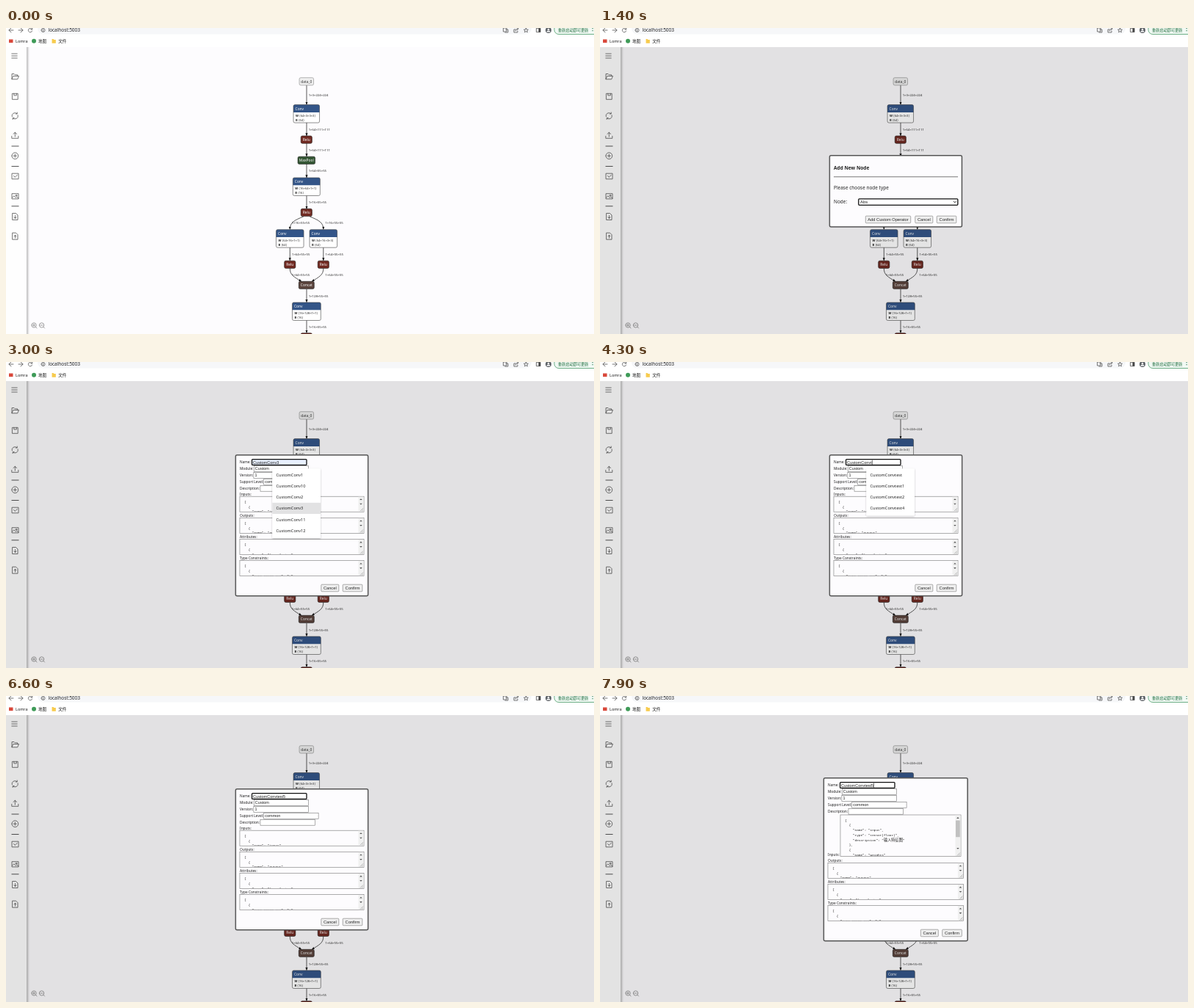
Recreate the animation shown at these times as an HTML page. Size 800 by 417 pixels, loop 8000 ms.

```html
<!DOCTYPE html>
<html lang="en">
<head>
<meta charset="utf-8">
<title>Model editor: add a custom operator</title>
<style>
  html, body { margin: 0; width: 100%; height: 100%; overflow: hidden; background: #fff; }
  svg { display: block; }
  text { white-space: pre; font-family: "Noto Sans", "Noto Sans CJK SC", sans-serif; }
  .ui { font-family: "Liberation Sans", Arial, sans-serif; }
  .code { font-family: "Liberation Mono", "Noto Sans CJK SC", monospace; }
  .icon { fill: none; stroke: #555; stroke-width: .8; stroke-linecap: round; stroke-linejoin: round; }
</style>
</head>
<body>
<svg id="stage" width="800" height="417" viewBox="0 0 800 417">
  <defs>
    <marker id="arrow" viewBox="0 0 4 4" refX="3.8" refY="2" markerWidth="4" markerHeight="4" markerUnits="userSpaceOnUse" orient="auto">
      <path d="M0 .4 4 2 0 3.6Z" fill="#111"/>
    </marker>
    <filter id="shadow" x="-20%" y="-20%" width="140%" height="140%">
      <feDropShadow dx="0" dy="1" stdDeviation="1.2" flood-opacity=".25"/>
    </filter>
    <linearGradient id="edge"><stop stop-color="#bbb"/><stop offset="1" stop-color="#bbb" stop-opacity="0"/></linearGradient>
  </defs>
  <g id="page"></g>
  <g id="overlay"></g>
</svg>
<script>
const LOOP = 8000;
const BLUE = '#335588', RED = '#702921', GREEN = '#335533', BROWN = '#59423b';
const PAPER = '#fdfcfe', INK = '#222';

const rect = (x, y, w, h, fill, extra = '') =>
  `<rect x="${x}" y="${y}" width="${w}" height="${h}" fill="${fill}" ${extra}/>`;
const text = (x, y, size, str, extra = '') =>
  `<text x="${x}" y="${y}" font-size="${size}" fill="${INK}" ${extra}>${str}</text>`;
const path = (d, extra = '') => `<path d="${d}" ${extra}/>`;
const icon = (x, y, d) => path(d, `class="icon" transform="translate(${x} ${y})"`);
const circle = (r) => `M${-r} 0a${r} ${r} 0 1 0 ${2 * r} 0a${r} ${r} 0 1 0 ${-2 * r} 0`;

// ---- browser bars and sidebar ----

function browser() {
  const small = [
    [7, 3, 'M3 0H-3M0 -3-3 0 0 3'], [20, 3, 'M-3 0H3M0 -3 3 0 0 3'],
    [33, 3, 'M2.4 -1.2A2.7 2.7 0 1 0 2.6 1M2.7 -3V-1H.7'],
    [50.5, 3, circle(2.5) + 'M0 -.2V1.4M0 -1.4V-1.3'],
    [680, 3, 'M-3 -3H1V2H-3ZM0 -1H3V3H-1'], [694, 3, 'M-1 -1H-3V3H2V1M-1 1Q-1 -2 3 -2M1 -4 3 -2 1 0'],
    [707.5, 3, 'M0 -3 .9 -.9 3 -.7 1.4 .7 1.9 2.8 0 1.7-1.9 2.8-1.4 .7-3 -.7-.9 -.9Z'],
    [724.5, 3, 'M-2.6 -2.6H2.6V2.6H-2.6Z'],
  ];
  return rect(0, 0, 800, 26, '#fff') +
    rect(43, -8, 672, 16.5, '#f6f7f9', 'rx="8"') +
    small.map(a => icon(...a)).join('') +
    rect(724.5, 0.4, 2.6, 5.2, '#444') +
    `<circle cx="738" cy="3" r="4" fill="#5f6368"/><circle cx="738" cy="2" r="1.3" fill="#fff"/>` +
    path('M735.4 5.6a2.6 2 0 0 1 5.2 0Z', 'fill="#fff"') +
    rect(746, -6, 60, 14.5, '#f1f9f4', 'rx="6" stroke="#4a9b68" stroke-width=".8"') +
    text(751, 5.2, 5.2, '重新启动即可更新', 'style="fill:#1e6b3a"') +
    rect(797.6, 0, 1, 1.2, '#1e6b3a') + rect(797.6, 3, 1, 1.2, '#1e6b3a') +
    text(57.5, 5.2, 6.4, 'localhost:5003') +
    rect(4, 15.5, 5.5, 4.6, '#d9483b') + text(13, 20, 5.5, 'Lomra') +
    '<circle cx="38" cy="17.8" r="3" fill="#3f9b58"/>' + text(44, 20, 5.5, '地图') +
    path('M62.5 15h2l.8 1h2.5v4.8h-5.3Z', 'fill="#f7cb4d"') + text(71.3, 20, 5.5, '文件');
}

function sidebar() {
  const doc = 'M-3.5 -4.5H1L3.5 -2V4.5H-3.5Z';
  const icons = [
    [11.5, 38, 'M-3.7 -3H3.7M-3.7 0H3.7M-3.7 3H3.7'],
    [12.5, 66, 'M-4.5 3.5V-3.5H-1.5L-.3 -2.2H3.2V-.5M-4.5 3.5-2.7 -.5H5L3.3 3.5Z'],
    [12.5, 93.3, 'M-3.7 -4H3.7V4H-3.7ZM-1.7 -4V-1.4H1.8V-4'],
    [12.2, 119.8, 'M-4 1A4.1 4.1 0 0 1 2.6 -3.2M4 -1A4.1 4.1 0 0 1 -2.6 3.2M3 -4.8V-2.8H1M-3 4.8V2.8H-1'],
    [12.3, 146.3, 'M-4.5 1V4H4.5V1M0 1.8V-4M-2.4 -1.8 0 -4 2.4 -1.8'],
    [12.3, 174.2, circle(4.4) + 'M-2.2 0H2.2M0 -2.2V2.2'],
    [12.7, 202, 'M-4.3 -3.8H4.3V3.8H-4.3ZM-2.2 -.6-.4 1.4 2.6 -1.8'],
    [12.7, 229.3, 'M-4.3 -3.6H4.3V3.6H-4.3ZM-4.3 1.8-1.8 -.4 .8 2 2 .9 4.3 2.6M.8 -1.6H2.4V-.4H.8Z'],
    [12.5, 257, doc + 'M0 -1.4V2.4M-1.5 .9 0 2.4 1.5 .9'],
    [12.5, 283.7, doc + 'M0 2.4V-1.4M-1.5 .1 0 -1.4 1.5 .1'],
  ];
  const zoom = circle(3.2) + 'M2.3 2.3 4 4M-1.5 0H1.5';
  return rect(28, 26, 4, 391, 'url(#edge)') + rect(0, 26, 28, 391, '#fefefe') +
    icons.map(a => icon(...a)).join('') +
    [161, 188.5, 242.8].map(y => path(`M7.5 ${y}H17.5`, 'stroke="#555"')).join('') +
    `<g opacity=".7">${icon(38, 405, zoom + 'M0 -1.5V1.5')}${icon(48.5, 405, zoom)}</g>`;
}

// ---- network graph ----

function pill(cx, y, w, label, fill, ink = '#fff') {
  return rect(cx - w / 2, y, w, 10.3, fill, `rx="2" stroke="${ink === '#fff' ? '#222' : '#888'}" stroke-width=".6"`) +
    text(cx, y + 7, 4.9, label, `text-anchor="middle" style="fill:${ink}"`);
}

function conv(cx, y, w, shape, bias) {
  const x = cx - w / 2;
  const param = (dy, name, value) => text(x + 3, y + dy, 4.1,
    `<tspan font-weight="700">${name}</tspan> ⟨${value}⟩`);
  return rect(x, y, w, 24.5, '#fff', 'rx="2"') +
    path(`M${x} ${y + 10.3}V${y + 2}q0 -2 2 -2H${x + w - 2}q2 0 2 2V${y + 10.3}Z`, `fill="${BLUE}"`) +
    rect(x, y, w, 24.5, 'none', 'rx="2" stroke="#444" stroke-width=".6"') +
    text(x + 2.5, y + 7.2, 4.9, 'Conv', 'style="fill:#fff"') +
    param(16, 'W', shape) + param(22, 'B', bias);
}

const edge = d => path(d, 'fill="none" stroke="#222" stroke-width=".75" marker-end="url(#arrow)"');
const link = (x, y1, y2, size, labelY) =>
  edge(`M${x} ${y1}V${y2}`) + text(x + 2.7, labelY, 4.25, size);

function graph() {
  const branches = [[386.3, 405], [431.8, 413]].map(([x, end], i) =>
    edge(`M${i ? 413 : 405} 256.8C${x - (i ? 6 : -6)} 262 ${x} 265 ${x} 274.5`) +
    text(x + 2.5, 267, 4.25, '1×16×55×55') +
    link(x, 299, 317, '1×64×55×55', 310) +
    edge(`M${x} 327.5C${x} 337 ${i ? 426 : 392} 339 ${i ? 416 : 402} 345.5`) +
    text(x + 2.5, 338, 4.25, '1×64×55×55') +
    conv(x, 274.7, 37.5, i ? '64×16×3×3' : '64×16×1×1', 64) +
    pill(x, 317.2, 15.2, 'Relu', RED)).join('');
  return link(409, 78, 104.5, '1×3×224×224', 93) +
    link(409, 129, 147, '1×64×111×111', 139.6) +
    link(409, 157, 175, '1×64×111×111', 168) +
    link(409, 185, 204, '1×64×55×55', 196) +
    link(409, 228, 246.5, '1×16×55×55', 239) +
    branches +
    link(409, 356, 373.8, '1×128×55×55', 366.6) +
    link(409, 398, 415.5, '1×16×55×55', 409) +
    pill(408.8, 67.7, 19.5, 'data_0', '#eee', '#333') +
    conv(408.8, 104.6, 35.5, '64×3×3×3', 64) +
    pill(408.8, 147, 15.2, 'Relu', RED) +
    pill(408.8, 175.2, 23.5, 'MaxPool', GREEN) +
    conv(408.8, 204, 37, '16×64×1×1', 16) +
    pill(408.8, 246.3, 15.2, 'Relu', RED) +
    pill(408.8, 345.3, 21, 'Concat', BROWN) +
    conv(408.9, 374, 38.8, '16×128×1×1', 16) +
    pill(408.8, 415.7, 15.2, 'Relu', RED);
}

// ---- dialogs ----

const frame = (x, y, w, h) =>
  rect(x, y, w, h, PAPER, 'rx="2" stroke="#555" stroke-width="1.5"');

const button = (x, y, w, label, hover) =>
  rect(x, y, w, 9.6, hover ? '#e2e2e2' : '#efefef', 'rx="1" stroke="#767676" stroke-width=".6"') +
  text(x + w / 2, y + 6.9, 5.7, label, 'class="ui" text-anchor="middle"');

const closing = (dx, y) => button(428.8 + dx, y, 24, 'Cancel') + button(458.2 + dx, y, 26.6, 'Confirm');

function nodeDialog(hover) {
  return frame(312.4, 173.8, 180, 97.2) +
    text(318, 193, 6.55, 'Add New Node', 'font-weight="700"') +
    path('M318 202.8H487', 'stroke="#555" stroke-width=".8"') +
    text(318, 220.2, 6.45, 'Please choose node type') +
    text(318, 239.3, 6.45, 'Node:') +
    rect(351.8, 232.8, 135, 8.5, '#fff', 'rx="1" stroke="#111" stroke-width="1.3"') +
    text(354, 239.2, 6, 'Abs', 'class="ui"') +
    path('M481 236.2l1.7 1.7 1.7-1.7', 'fill="none" stroke="#111" stroke-width="1"') +
    button(361.3, 256.2, 61.4, 'Add Custom Operator', hover) + closing(0, 256.2);
}

const codeLines = first => ['  [', '    {', `      ${first},`];
const inputLines = [...codeLines('"name": "input"'), '      "type": "tensor(float)",',
  '      "description": "<tspan font-size="5.2">输入特征图</tspan>"', '    },', '    {', '      "name": "weights",'];

function textarea(x, y, w, h, lines) {
  const right = x + w, bottom = y + h, thumb = (h - 20) * .62;
  const arrow = (cy, s) => path(`M${right - 5.9} ${cy + s}h3.6l-1.8 ${-2 * s}Z`, 'fill="#555"');
  return rect(x, y, w, h, '#fdfcfe', 'stroke="#777" stroke-width=".6"') +
    `<svg x="${x}" y="${y + .4}" width="${w - 7.5}" height="${h - .8}">` +
    lines.map((s, i) => text(1.2, 8.2 + i * 6.75, 4.38, s, 'class="code"')).join('') + '</svg>' +
    rect(right - 7.6, y + .5, 7.1, h - 1, '#f0f0f0') +
    (thumb > 4 ? rect(right - 7, y + 7.6, 5.8, thumb, '#c1c1c1') : '') +
    arrow(y + 4, .9) + arrow(bottom - 10.6, -.9) +
    path(`M${right - 5} ${bottom - 1}l4-4M${right - 2.7} ${bottom - 1}l1.7-1.7`, 'stroke="#888" stroke-width=".6"');
}

function customDialog({ name, preview, caret, inputHeight }) {
  const wide = inputHeight > 22;
  const left = wide ? -8 : 0, right = wide ? 7.5 : 0;
  const dy = wide ? (inputHeight - 26.5) / 2 : 0;
  const x = 318 + left, areaWidth = 169 + right - left;
  const fields = [['Name:', 334.6, ''], ['Module:', 337.3, 'Custom'], ['Version:', 336.9, '1'],
    ['Support Level:', 350.7, 'common'], ['Description:', 346, '']];

  let out = frame(312.4 + left, 126.7 - dy, 180.2 + right - left, 192 + 2 * dy);
  fields.forEach(([label, fx, value], i) => {
    const y = 138.2 + i * 8.95 - dy, focus = i === 0;
    out += text(x, y, 4.8, label) +
      rect(fx + left, y - 5.6, 74.4, 7.8, focus && preview ? '#e8f0fe' : '#fff',
        focus ? 'rx="1" stroke="#111" stroke-width="1.3"' : 'stroke="#777" stroke-width=".6"') +
      text(fx + left + 1.5, y + .3, 5.55, focus ? name : value, 'class="ui"' + (focus ? ' id="name"' : ''));
  });
  if (caret) out += rect(0, 133.6 - dy, .6, 6.2, '#111', 'id="caret"');

  if (wide) {
    out += text(x, 203.4 + dy, 4.8, 'Inputs:') +
      textarea(x + 17, 177 - dy, 164, inputHeight, inputLines);
  } else {
    out += text(x, 182, 4.8, 'Inputs:') + textarea(x, 183.2, 169, 21, inputLines);
  }
  [['Outputs:', '"name": "output"'], ['Attributes:', '"name": "kernel_size"'],
    ['Type Constraints:', '"type_param_str": "T"']].forEach(([label, first], i) => {
    const y = 212.4 + i * 29.1 + dy;
    out += text(x, y - 1.6, 4.8, label) + textarea(x, y, areaWidth, 21, codeLines(first));
  });
  return out + closing(right, 303.2 + dy);
}

function suggestions(items, active) {
  const step = 15.2;
  return rect(362.3, 145.2, 65.7, items.length * step + 3.6, '#fff', 'rx="1" filter="url(#shadow)"') +
    items.map((s, i) => (i === active ? rect(362.3, 146.2 + i * step, 65.7, step, '#e2e2e3') : '') +
      text(367.5, 155.8 + i * step, 5.62, s)).join('');
}

// ---- timeline ----

const convNames = ['1', '10', '2', '3', '11', '12'].map(n => 'CustomConv' + n);
const testNames = ['', '1', '2', '4'].map(n => 'CustomConvtest' + n);
const hoverSteps = [[2800, 1], [2900, 2], [3000, 3], [3100, 2], [3200, 1], [3300, 0], [3400, -1]];
const keys = [[4300, 't'], [4600, 'e'], [4900, 's'], [5100, 't'], [5900, '5']];

function overlay(t) {
  if (t < 900) return '';
  if (t < 1400) return rect(28, 170, 33, 13, '#fff') + text(29.5, 179, 6.55, 'Add Node');
  const shade = rect(0, 26, 800, 391, '#000', 'opacity=".105"');
  if (t < 2400) return shade + nodeDialog(t >= 2100);

  const hover = hoverSteps.reduce((now, [at, item]) => t >= at ? item : now, -1);
  const typed = keys.filter(([at]) => t >= at);
  const lastKey = typed.length ? typed[typed.length - 1][0] : 3300;
  const preview = hover >= 0;
  const name = preview ? convNames[hover] : 'CustomConv' + typed.map(k => k[1]).join('');
  const caret = !preview && t >= 2700 && Math.floor((t - lastKey) / 500) % 2 === 0;
  const inputHeight = t < 7800 ? 21 : t < 7900 ? 40 : 56.5;

  let out = shade + customDialog({ name, preview, caret, inputHeight });
  if (t >= 2700 && t < 5900) out += suggestions(t < 4300 ? convNames : testNames, hover);
  return out;
}

document.getElementById('page').innerHTML =
  rect(0, 26, 800, 391, PAPER) + graph() + sidebar() + browser();

const layer = document.getElementById('overlay');
let shown = null;

function draw(t) {
  const markup = overlay(t);
  if (markup === shown) return;
  layer.innerHTML = shown = markup;
  const caret = document.getElementById('caret');
  if (caret) {
    const name = document.getElementById('name');
    caret.setAttribute('x', +name.getAttribute('x') + name.getComputedTextLength() + .2);
  }
}

const start = performance.now();
function tick() {
  draw((performance.now() - start) % LOOP);
  requestAnimationFrame(tick);
}
tick();
</script>
</body>
</html>
```
